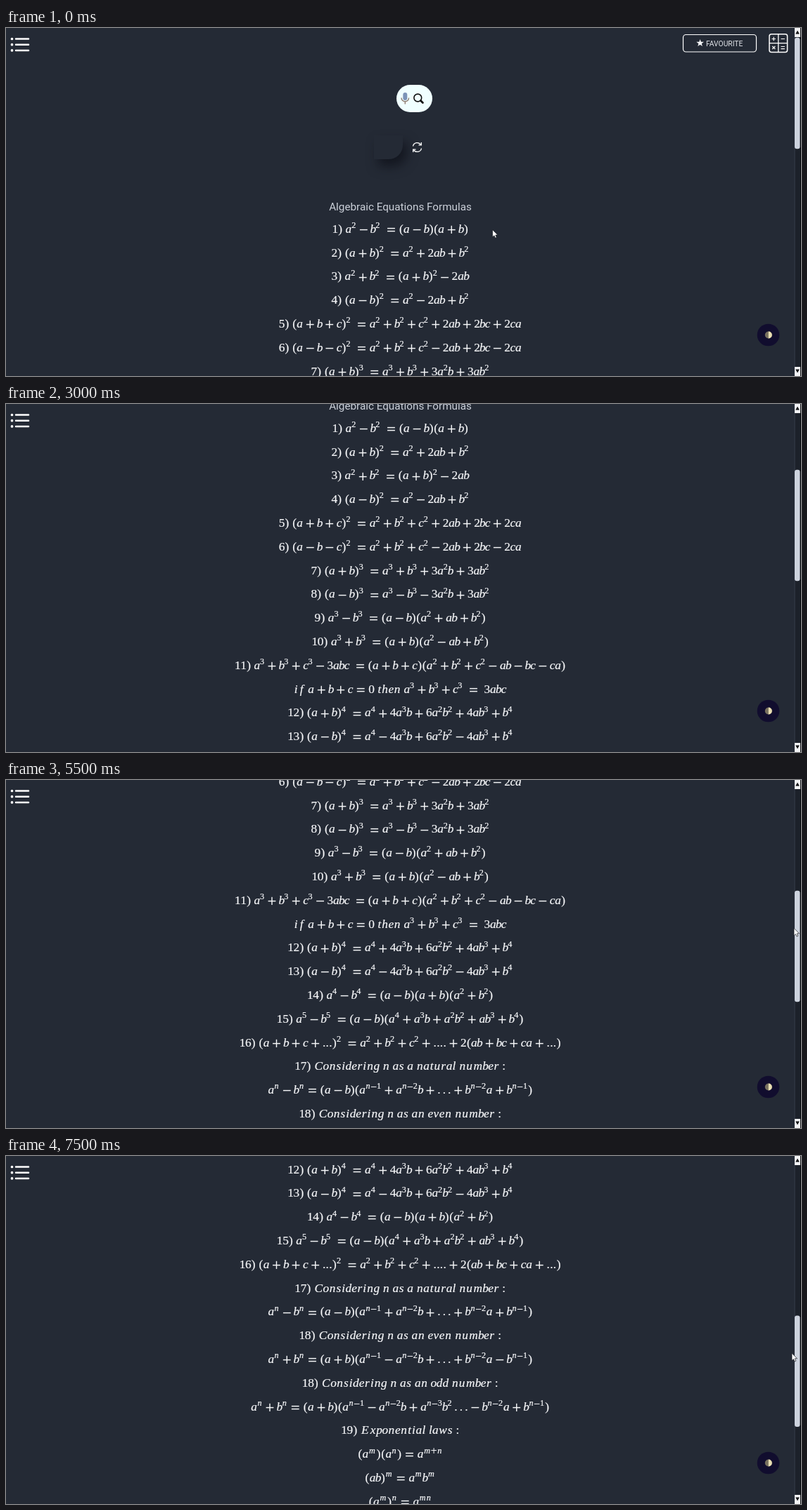
Recreate the animation shown at these times as an HTML page. Size 1130x496 px, loop 8 s.

```html
<!DOCTYPE html>
<html lang="en">
<head>
<meta charset="utf-8">
<title>Algebraic formulas</title>
<style>
html, body { margin: 0; width: 100%; height: 100%; overflow: hidden; background: #242a35; }
svg { display: block; }
.math { font: 17.3px "Liberation Serif", serif; fill: #f6f7f9; stroke: #f6f7f9; stroke-width: .22; text-anchor: middle; }
.math .it { font-style: italic; }
.math .op { font: 17.3px "DejaVu Sans", sans-serif; stroke: none; }
.math .sup { font-size: 12.2px; }
.ui { font-family: Roboto, sans-serif; }
.line { fill: none; stroke: #fff; }
#blob { filter: drop-shadow(6px 10px 8px rgba(8, 10, 18, .62)); }
</style>
</head>
<body>
<svg width="1130" height="496" viewBox="0 0 1130 496">
  <rect width="1130" height="496" fill="#242a35"/>
  <g id="page">
    <g class="line" stroke="#dfe2e8">
      <rect x="962.5" y="9.5" width="104" height="24.5" rx="4" stroke-width="1.2"/>
      <rect x="1085" y="8.8" width="25.6" height="25.6" rx="3" stroke-width="1.5"/>
      <path d="M1097.8 9V34M1085 21.6H1111" stroke-width="1.3"/>
      <path d="M1088.5 15.5h5.4m-2.7-2.7v5.4M1101.500 15.500h5.400M1089.300 26l4 4m0-4l-4 4M1101.500 26.500h5.400m-5.400 3.200h5.400" stroke-width="1.2"/>
    </g>
    <path id="star" fill="#f4f5f7"/>
    <text class="ui" x="995" y="25.6" font-size="10.3" fill="#e2e5ea">FAVOURITE</text>

    <rect x="555" y="81" width="51" height="39" rx="19.5" fill="#f0ffff"/>
    <rect x="564.3" y="92" width="6" height="11" rx="3" fill="#7c94b8"/>
    <path d="M562 99.500a5.300 5.300 0 0 0 10.600 0M567.300 105v3.600" fill="none" stroke="#8e7c70" stroke-width="1.4"/>
    <circle cx="585.300" cy="99.500" r="5.400" fill="none" stroke="#111" stroke-width="1.600"/>
    <path d="M589.400 103.400l3 3" stroke="#111" stroke-width="2.800" stroke-linecap="round"/>

    <path id="blob" d="M523 153H564V167A20 20 0 0 1 544 187H523Z" fill="#242a35"/>
    <g class="line" stroke-width="1.3">
      <path d="M578.500 168.500a6 6 0 0 1 11-2.100M590.500 171.500a6 6 0 0 1-11 2.100"/>
      <path d="M590.300 163v3.800h-3.800M578.700 177v-3.800h3.800"/>
    </g>
    <text class="ui" x="560.500" y="259.500" font-size="15.25" fill="#cbd0d9" text-anchor="middle">Algebraic Equations Formulas</text>
    <g id="rows" class="math"></g>
  </g>

  <g class="line" stroke-width="2.500" stroke-linecap="round">
    <path d="M14 15.500H32M14 23.700H32M14 31.900H32"/>
    <path d="M8.500 15.500h.01M8.500 23.700h.01M8.500 31.900h.01" stroke-width="3.700"/>
  </g>

  <circle cx="1083.500" cy="437.500" r="15.800" fill="#110d2e"/>
  <circle cx="1083.800" cy="437.500" r="5" fill="#77705f"/>
  <path d="M1083.800 432.500a5 5 0 0 1 0 10z" fill="#eadfb4"/>

  <rect x="1120.500" width="9.500" height="496" fill="#1c212a"/>
  <path d="M1121 0V496" stroke="#39414e"/>
  <path d="M1129.500 0V496" stroke="#07090c"/>
  <path d="M1121 0h8v13h-8zM1121 483h8v13h-8z" fill="#f3f4f6"/>
  <path d="M1122.200 8.500h5.600l-2.800-5zM1122.200 486.500h5.600l-2.800 5z" fill="#0b0c0f"/>
  <rect id="thumb" x="1121" y="14" width="7.500" height="158.500" rx="3" fill="#cdd3de"/>
  <path id="cursor" d="M0 0V10.500L2.400 8.300L4 11.800L5.800 11L4.300 7.600H7.500Z" fill="#fff" stroke="#15181f" stroke-width=".7"/>
</svg>
<script>
const EM = 16.65, MID = 560.3, FIRST = 291.7, STEP = 33.8;
const LOOP = 8000, HOLD = 500;

// ^x or ^{xyz} raises; a blank is a quarter em, ~ a thin space
const ROWS = [
  '1) a^2-b^2 =(a-b)(a+b)',
  '2) (a+b)^2 =a^2+2ab+b^2',
  '3) a^2+b^2 =(a+b)^2-2ab',
  '4) (a-b)^2 =a^2-2ab+b^2',
  '5) (a+b+c)^2 =a^2+b^2+c^2+2ab+2bc+2ca',
  '6) (a-b-c)^2 =a^2+b^2+c^2-2ab+2bc-2ca',
  '7) (a+b)^3 =a^3+b^3+3a^2b+3ab^2',
  '8) (a-b)^3 =a^3-b^3-3a^2b+3ab^2',
  '9) a^3-b^3 =(a-b)(a^2+ab+b^2)',
  '10) a^3+b^3 =(a+b)(a^2-ab+b^2)',
  '11) a^3+b^3+c^3-3abc =(a+b+c)(a^2+b^2+c^2-ab-bc-ca)',
  'if a+b+c=0 then a^3+b^3+c^3 = 3abc',
  '12) (a+b)^4 =a^4+4a^3b+6a^2b^2+4ab^3+b^4',
  '13) (a-b)^4 =a^4-4a^3b+6a^2b^2-4ab^3+b^4',
  '14) a^4-b^4 =(a-b)(a+b)(a^2+b^2)',
  '15) a^5-b^5 =(a-b)(a^4+a^3b+a^2b^2+ab^3+b^4)',
  '16) (a+b+c+...)^2 =a^2+b^2+c^2+....+2(ab+bc+ca+...)',
  '17) Considering n as a natural number:',
  'a^n-b^n=(a-b)(a^{n-1}+a^{n-2}b+.~.~.+b^{n-2}a+b^{n-1})',
  '18) Considering n as an even number:',
  'a^n+b^n=(a+b)(a^{n-1}-a^{n-2}b+.~.~.+b^{n-2}a-b^{n-1})',
  '18) Considering n as an odd number:',
  'a^n+b^n=(a+b)(a^{n-1}-a^{n-2}b+a^{n-3}b^2~.~.~.-b^{n-2}a+b^{n-1})',
  '19) Exponential laws:',
  '(a^m)(a^n)=a^{m+n}',
  '(ab)^m=a^mb^m',
  '(a^m)^n=a^{mn}'
];

// Advances of TeX math glyphs in em
const ADV = {
  a: .529, b: .429, c: .433, d: .52, e: .466, f: .598, g: .513, h: .576, i: .345,
  l: .318, m: .878, n: .6, o: .485, p: .503, r: .479, s: .469, t: .361, u: .572,
  v: .521, w: .743, x: .572, C: .787, E: .796, '(': .389, ')': .389,
  '+': .778, '-': .778, '=': .778, '.': .278, ':': .278, ' ': .25, '~': .167
};
const GAP = { '+': .222, '-': .222, '=': .278, ':': .278 };

function layout(src) {
  const out = [];
  let x = 0;
  const put = (ch, sup) => {
    const k = sup ? .7 : 1, gap = sup ? 0 : GAP[ch] || 0, w = (ADV[ch] || .5) * k;
    x += gap;
    if (!' ~'.includes(ch)) out.push({ ch, sup, x: x + w / 2 });
    x += w + (ch === ':' ? 0 : gap);
  };
  for (const [, group, one, plain] of src.matchAll(/\^\{(.+?)\}|\^(.)|(.)/g)) {
    if (plain) { put(plain, false); continue; }
    for (const ch of group || one) put(ch, true);
    x += .05;
  }
  return { out, width: x };
}

function rowMarkup(src, i) {
  const { out, width } = layout(src);
  const base = FIRST + i * STEP;
  const glyphs = out.map(({ ch, sup, x }) => {
    const op = '+-='.includes(ch);
    const kind = (op ? 'op' : /[a-z]/i.test(ch) ? 'it' : '') + (sup ? ' sup' : '');
    const y = base - (sup ? .4 * EM : 0) + (op ? (sup ? .8 : 1.2) : 0);
    const px = MID + (x - width / 2) * EM;
    return `<tspan class="${kind}" x="${px.toFixed(2)}" y="${y.toFixed(2)}">${ch === '-' ? '−' : ch}</tspan>`;
  });
  return `<text>${glyphs.join('')}</text>`;
}

const el = id => document.getElementById(id);
el('rows').innerHTML = ROWS.map(rowMarkup).join('');

const tips = Array.from({ length: 10 }, (_, i) => {
  const r = i % 2 ? 2.3 : 5.6, t = i * Math.PI / 5;
  return `${986.6 + r * Math.sin(t)} ${21.5 - r * Math.cos(t)}`;
});
el('star').setAttribute('d', `M${tips.join('L')}Z`);

// Scroll position and pointer x per hold; 0 means the pointer is hidden
const SCROLL = [0, 0, 0, 115, 184, 242.500, 252, 261, 312, 366.300, 408, 453, 497.700, 556, 614, 672.700];
const POINTER = [691.500, 1117, 0, 0, 0, 0, 0, 0, 0, 1124, 1123, 1120, 1118.500, 1118, 1117.500, 1117];
const FREE_Y = [287.500, 93];

function draw(now) {
  const i = Math.floor(now % LOOP / HOLD);
  const top = 13.700 + SCROLL[i] * .318;
  el('page').setAttribute('transform', `translate(0 ${-SCROLL[i]})`);
  el('thumb').setAttribute('y', top);
  el('cursor').setAttribute('visibility', POINTER[i] ? 'visible' : 'hidden');
  el('cursor').setAttribute('transform', `translate(${POINTER[i]} ${FREE_Y[i] ?? top + 53.500})`);
}

const start = performance.now();
(function tick() {
  draw(performance.now() - start);
  requestAnimationFrame(tick);
})();
</script>
</body>
</html>
```
